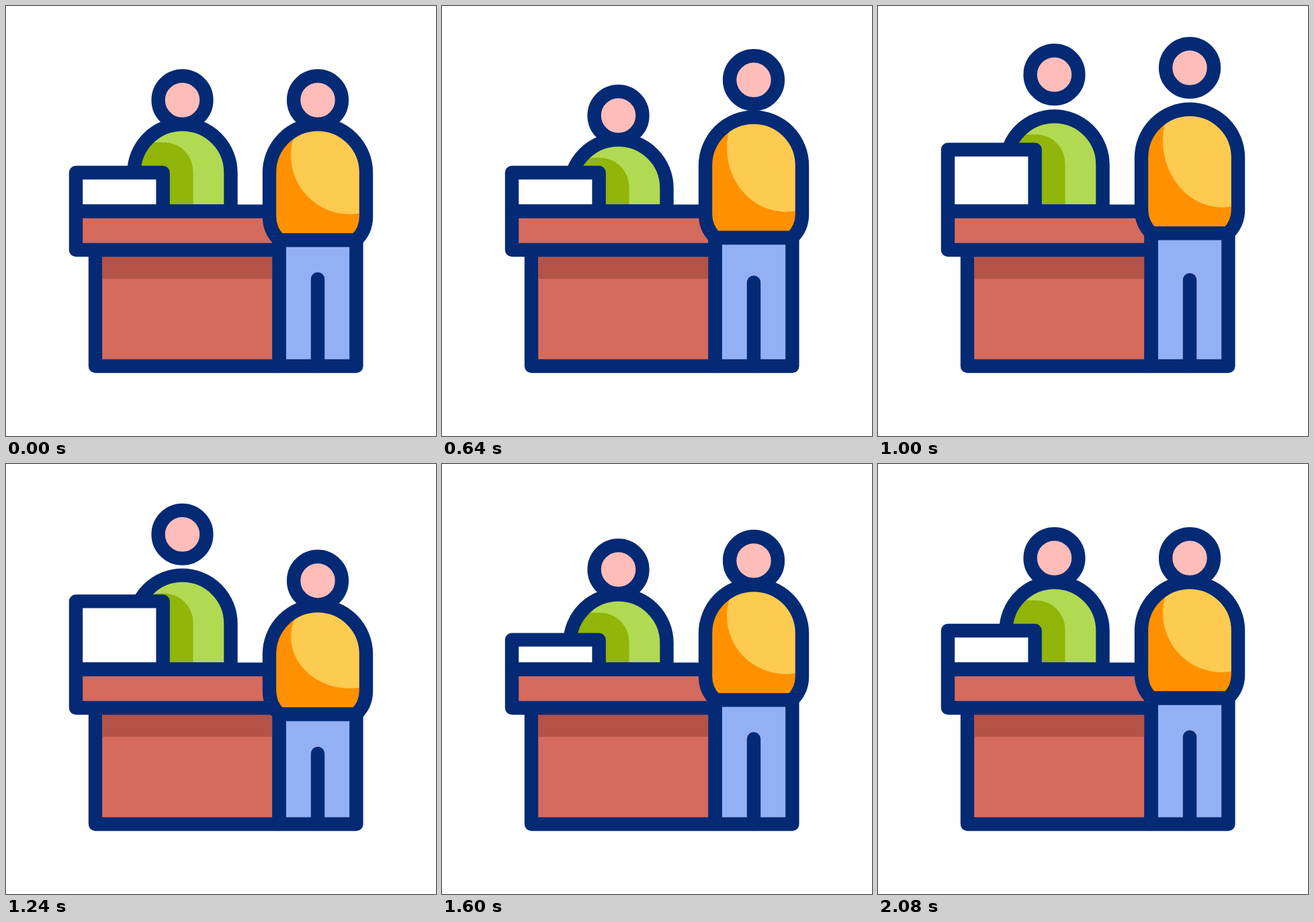
Animation, 640 px wide and 640 px high, one loop 2.2 s. Source, as an HTML page with a canvas:

```html
<!DOCTYPE html>
<html lang="en">
<head>
<meta charset="utf-8">
<title>Service counter</title>
<style>
  html, body { margin: 0; width: 100%; height: 100%; overflow: hidden; background: #fff; }
  canvas { display: block; width: 640px; height: 640px; }
</style>
</head>
<body>
<canvas id="stage"></canvas>
<script>
const LOOP = 2200, STEP = 40;
const NAVY = '#042a75', PINK = '#ffbdb9';

// Every part dips, lifts, hangs, dips again and settles.
// beats: start, first dip, top, end of hang, second dip, rest (ms)
// soft: first dip as a share of the second
const guestMove = { beats: [200, 310, 820, 960, 1270, 1685], soft: 0.7 };
const clerkMove = { beats: [480, 640, 1045, 1150, 1670, 2080], soft: 1.15 };
const screenMove = { beats: [660, 780, 1085, 1200, 1640, 2080], soft: 0.8 };

function ease(t, from, to) {
  const u = Math.min(1, Math.max(0, (t - from) / (to - from)));
  return u * u * (3 - 2 * u);
}

// Vertical offset, positive downwards
function offset(t, { beats: [start, dip1, top, drop, dip2, rest], soft }, dip, lift) {
  const first = dip * soft;
  return first * ease(t, start, dip1)
    - (first + lift) * ease(t, dip1, top)
    + (lift + dip) * ease(t, drop, dip2)
    - dip * ease(t, dip2, rest);
}

const canvas = document.getElementById('stage');
const ctx = canvas.getContext('2d');
const ratio = window.devicePixelRatio || 1;
canvas.width = canvas.height = 640 * ratio;
ctx.scale(ratio, ratio);
ctx.lineJoin = ctx.lineCap = 'round';
ctx.lineWidth = 20.4;
ctx.strokeStyle = NAVY;

function paint(path, color, shade) {
  ctx.fillStyle = color;
  ctx.fill(path);
  if (shade) {
    ctx.save();
    ctx.clip(path);
    shade();
    ctx.restore();
  }
  ctx.stroke(path);
}

function box(left, top, right, bottom, color) {
  const p = new Path2D();
  p.rect(left, top, right - left, bottom - top);
  paint(p, color);
}

function head(x, y) {
  const p = new Path2D();
  p.arc(x, y, 35.9, 0, Math.PI * 2);
  paint(p, PINK);
}

function clerk(t) {
  const top = 176 + offset(t, clerkMove, 20, 13);
  const p = new Path2D(`M190.5 305.5V${top + 72}a72 72 0 0 1 144 0V305.5z`);
  paint(p, '#b1d952', () => {
    ctx.fillStyle = '#91b508';
    ctx.fill(new Path2D(`M180 ${top + 27}H235a43.5 43.5 0 0 1 43.5 43.5V310H180z`));
  });
  head(262.5, 140 + offset(t, clerkMove, 20, 40));
}

function counter(t) {
  box(104, 248 + offset(t, screenMove, 15, 45), 233.6, 305.5, '#fff');
  box(133, 363, 406.5, 536, '#d46b5d');
  ctx.fillStyle = '#b35347';
  ctx.fillRect(143, 373, 253.3, 33);
  box(104, 305.7, 406.5, 363, '#d46b5d');
}

function guest(t) {
  const move = (dip, lift) => offset(t, guestMove, dip, lift);
  const top = 176 + move(36.5, 25), hip = 348.5 + move(25, 12);
  const p = new Path2D(`M407 ${hip}A48 48 0 0 1 392 ${hip - 35}V${top + 72}a72 72 0 0 1 144 0V${hip - 35}A48 48 0 0 1 521 ${hip}z`);
  paint(p, '#ff9100', () => {
    ctx.fillStyle = '#fdcb50';
    ctx.beginPath();
    ctx.ellipse(512, top + 46, 88, hip - top - 84.5, 0, 0, Math.PI * 2);
    ctx.fill();
  });
  head(464, 140 + move(36, 52));
  box(406.7, hip, 521.4, 536, '#94b0f4');
  ctx.stroke(new Path2D(`M464 ${406.5 + move(25, 0)}V536`));
}

function draw(t) {
  ctx.fillStyle = '#fff';
  ctx.fillRect(0, 0, 640, 640);
  clerk(t);
  counter(t);
  guest(t);
}

const start = performance.now();
function tick() {
  const t = (performance.now() - start) % LOOP;
  draw(Math.floor(t / STEP) * STEP);
  requestAnimationFrame(tick);
}
tick();
</script>
</body>
</html>
```
